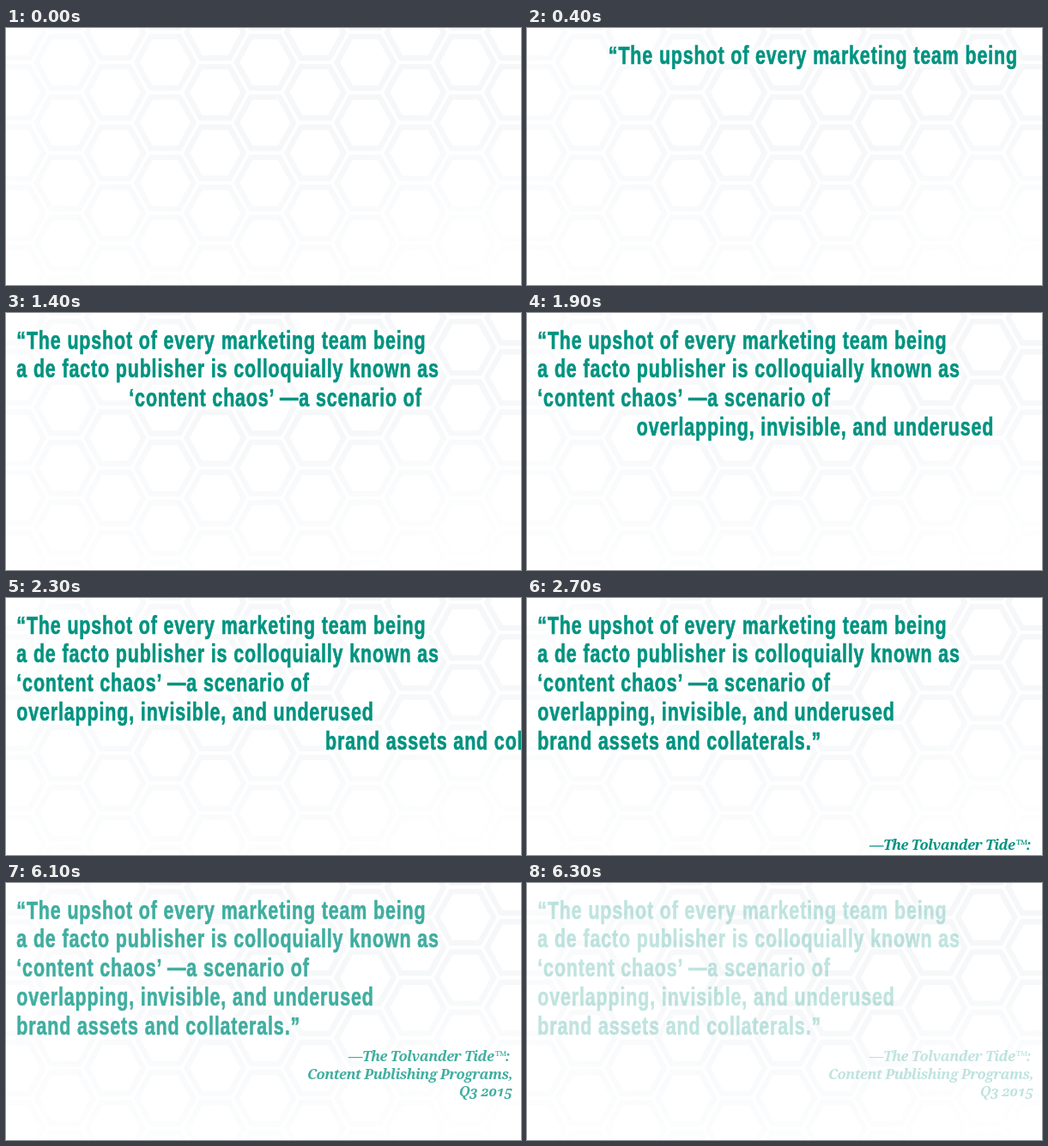
An HTML page with a canvas that plays this animation: 600x300 px, repeating every 6.4 s.

```html
<!DOCTYPE html>
<html lang="en">
<head>
<meta charset="utf-8">
<title>Quote</title>
<style>
  html, body { margin: 0; width: 100%; height: 100%; overflow: hidden; background: #fff; }
  canvas, svg { position: absolute; left: 0; top: 0; width: 600px; height: 300px; }
  svg { overflow: hidden; fill: #009380; }
  /* soft white halo that keeps the pattern away from the letters */
  #words { filter: drop-shadow(0 0 5px #fff) drop-shadow(0 0 5px #fff); }
  .quote {
    font: bold 29px "Liberation Sans", Arial, sans-serif;
    letter-spacing: 1.15px;
    stroke: #009380;
    stroke-width: 0.7px;
  }
  .credit {
    font: italic bold 16.5px "Noto Serif", serif;
    font-variant-numeric: oldstyle-nums;
    letter-spacing: -0.5px;
    text-anchor: end;
  }
</style>
</head>
<body>
<canvas id="back" width="600" height="300"></canvas>
<svg id="stage" viewBox="0 0 600 300"><g id="words"></g></svg>
<script>
const LOOP = 6400, STEP = 100;
const SPEED = 1.65;     // px per ms for the sliding lines
const CONDENSE = 0.74;  // narrow cut of the headline face
const LEFT = 12.3, TOP = 41.5, LEADING = 33.75;

// Each line with the time at which it comes to rest.
const quote = [
  ["“The upshot of every marketing team being", 450],
  ["a de facto publisher is colloquially known as", 959.4],
  ["‘content chaos’ —a scenario of", 1479.4],
  ["overlapping, invisible, and underused", 1970],
  ["brand assets and collaterals.”", 2518]
];
const credit = [
  ["—The Tolvander Tide™:", 587, 208],
  ["Content Publishing Programs,", 590, 228.5],
  ["Q3 2015", 590, 248.5]
];

const words = document.getElementById("words");

function addNode(parent, tag, attrs, text = "") {
  const node = document.createElementNS("http://www.w3.org/2000/svg", tag);
  for (const key in attrs) node.setAttribute(key, attrs[key]);
  node.textContent = text;
  return parent.appendChild(node);
}

const lines = quote.map(([text]) => addNode(words, "text", { class: "quote" }, text));
const byline = addNode(words, "g", { class: "credit" });
for (const [text, x, y] of credit) addNode(byline, "text", { x, y }, text);

function hexagon(ctx, x, y, scale) {
  const w = 38.9 * scale, h = 35.2 * scale;
  ctx.moveTo(x - w, y);
  ctx.lineTo(x - w / 2, y - h);
  ctx.lineTo(x + w / 2, y - h);
  ctx.lineTo(x + w, y);
  ctx.lineTo(x + w / 2, y + h);
  ctx.lineTo(x - w / 2, y + h);
  ctx.closePath();
}

function veil(ctx, gradient, from, to) {
  gradient.addColorStop(0, `rgba(255,255,255,${from})`);
  gradient.addColorStop(1, `rgba(255,255,255,${to})`);
  ctx.fillStyle = gradient;
  ctx.fillRect(0, 0, 600, 300);
}

function drawBack() {
  const ctx = document.getElementById("back").getContext("2d");
  ctx.fillStyle = "#fff";
  ctx.fillRect(0, 0, 600, 300);
  ctx.beginPath();
  for (let col = -6; col <= 6; col++) {
    for (let row = -2; row <= 3; row++) {
      const x = 302 + col * 58.3;
      const y = 110.5 + (row + (col % 2 ? 0.5 : 0)) * 70.4;
      hexagon(ctx, x, y, 0.945);
      hexagon(ctx, x, y, 0.76);
    }
  }
  ctx.fillStyle = "#f5f7f9";
  ctx.fill("evenodd");
  veil(ctx, ctx.createLinearGradient(0, 0, 260, 60), 0.6, 0);
  veil(ctx, ctx.createLinearGradient(0, 130, 0, 300), 0, 0.75);
  veil(ctx, ctx.createRadialGradient(560, 290, 40, 560, 290, 220), 0.7, 0);
}

function render(now) {
  const t = Math.floor((now % LOOP) / STEP) * STEP;
  lines.forEach((line, i) => {
    const x = LEFT + Math.max(0, (quote[i][1] - t) * SPEED);
    const y = TOP + i * LEADING;
    line.setAttribute("transform", `translate(${x} ${y}) scale(${CONDENSE} 1)`);
  });
  byline.setAttribute("transform", `translate(0 ${Math.max(0, (3100 - t) * 0.215)})`);
  words.setAttribute("opacity", Math.min(1, (LOOP - t) / 400));
}

function tick() {
  render(performance.now());
  requestAnimationFrame(tick);
}

drawBack();
tick();
</script>
</body>
</html>
```
